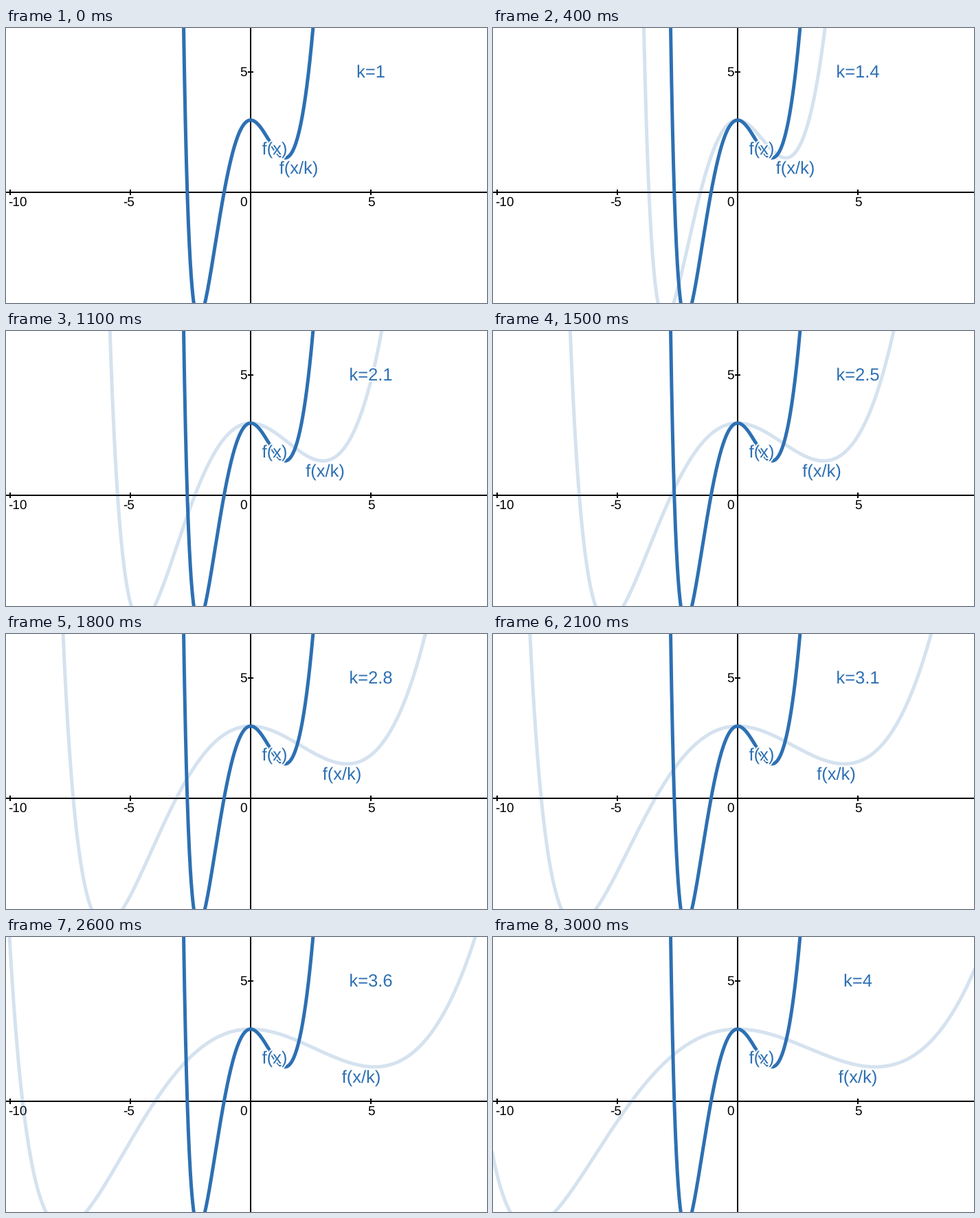
Recreate the animation shown at these times as a matplotlib script. Size 700 px wide and 400 px high, loop 3100 ms.

```python
import matplotlib.pyplot as plt
import numpy as np
from matplotlib.animation import FuncAnimation
from matplotlib.patheffects import withStroke

W, H, DPI = 700, 400, 100
PT = 72 / DPI              # points per pixel
X0, Y0, UNIT = 356, 239, 35
BLUE = "#2d70b3"
FRAMES, INTERVAL = 31, 100

NODES = (-2.785, -1.9, -1.104, 1.45, 2.597)
COEFS = (-3.448, -0.1209, 0.199, -0.001, -0.0039, 0.0012)


def f(x):
    """Smooth curve with a peak at 0 and a steep left wall (Newton form)."""
    poly = COEFS[-1]
    for node, coef in zip(NODES[::-1], COEFS[-2::-1]):
        poly = poly * (x - node) + coef
    return 3 + x**2 * (poly + 2.03 / (x + 3.3))


def px(x):
    return X0 + UNIT * x


def py(y):
    return Y0 - UNIT * y


plt.rcParams["font.family"] = "Liberation Sans"
plt.rcParams["text.hinting"] = "none"

fig = plt.figure(figsize=(W / DPI, H / DPI), dpi=DPI, facecolor="white")
ax = fig.add_axes([0, 0, 1, 1])
ax.set_xlim(0, W)
ax.set_ylim(H, 0)
ax.axis("off")


def stroke(xs, ys, color="black", width=2, **kw):
    return ax.plot(xs, ys, color=color, lw=width * PT, **kw)[0]


def text(x, y, s, size=19, color="black", halo=0, **kw):
    t = ax.text(x, y, s, fontsize=size * PT, color=color,
                ha="center", va="baseline", **kw)
    if halo:
        t.set_path_effects([withStroke(linewidth=halo * PT, foreground="white")])
    return t


def label(x, y, s):
    return text(px(x), py(y) + 8, s, size=25.5, color=BLUE, halo=4, zorder=5)


# axes, ticks and numbers
stroke([0, W], [Y0, Y0], zorder=1)
stroke([X0, X0], [0, H], zorder=1)
for x in (-10, -5, 5):
    stroke([px(x)] * 2, [Y0 - 4, Y0 + 4], zorder=1, solid_capstyle="butt")
stroke([X0 - 4, X0 + 4], [py(5)] * 2, zorder=1, solid_capstyle="butt")
for x, s in ((17, "-10"), (178.5, "-5"), (346, "0"), (531.5, "5")):
    text(x, 259, s, zorder=1)
text(346, 69.5, "5", zorder=1)

# curves
u = np.linspace(-3, 3, 900)
ys = py(f(u))
stretched = stroke(px(u), ys, BLUE, 5, alpha=0.2, zorder=2)
stroke(px(u), ys, BLUE, 5, zorder=3)

k_label = label(5, 5, "k=1")
label(1, 1.8, "f(x)")
fk_label = label(2, 1, "f(x/k)")


def update(i):
    k = 1 + i / 10
    stretched.set_xdata(px(k * u))
    k_label.set_text(f"k={k:.2g}")
    fk_label.set_x(px(k + 1))
    return stretched, k_label, fk_label


anim = FuncAnimation(fig, update, frames=FRAMES, interval=INTERVAL,
                     repeat=True, repeat_delay=0)
plt.show()
```
